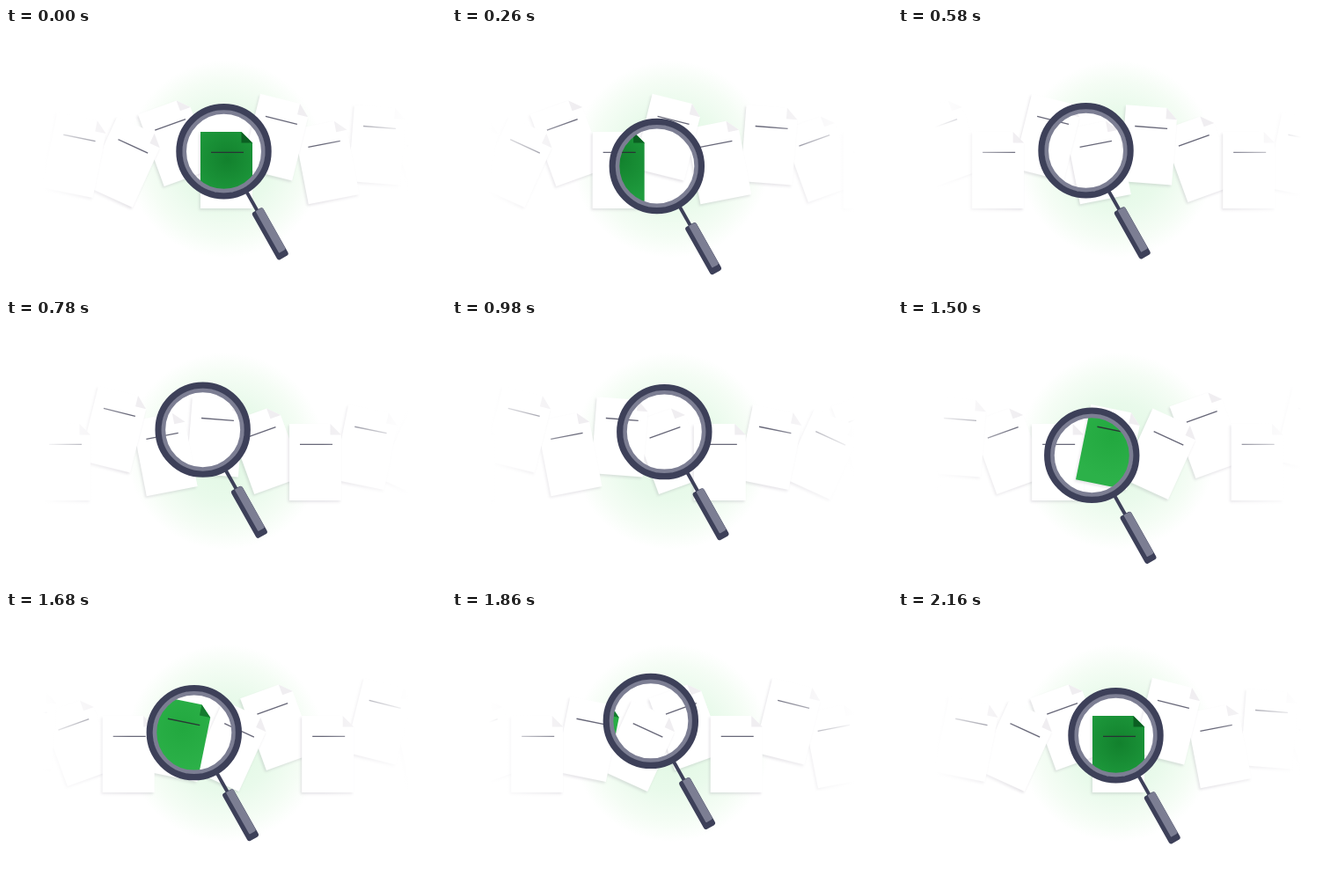
Recreate the animation shown at these times as an HTML page with a canvas. Size 500 by 300 pixels, loop 3580 ms.

```html
<!DOCTYPE html>
<html lang="en">
<head>
<meta charset="utf-8">
<title>Document search</title>
<style>
  html, body { margin: 0; width: 100%; height: 100%; overflow: hidden; background: #fff; }
  canvas { display: block; width: 500px; height: 300px; }
</style>
</head>
<body>
<canvas id="stage" width="500" height="300"></canvas>
<script>
const ctx = document.getElementById('stage').getContext('2d');
const LOOP = 3580, MOVE = 2160, STEP = 20, SPEED = 0.2359;
const TURN = 1140; // end of the first lens turn
const DARK = '#3d4059', LIGHT = '#7c7e93';

// x and y of the title line, tilt in degrees, colours under the lens
const deep = ['#12812d', '#1f9c3e', '#0b5f22'];
const bright = ['#22a83f', '#2cb149', '#147a2e'];
const papers = [
  [83.5, 124.5, 11.5], [144.5, 134, 24.5], [186.5, 109.5, -20], [251.5, 141, 0, deep],
  [313, 104.5, 14], [361.5, 131.5, -11], [424.5, 112.5, 4.5], [473, 127.5, -20],
  [536.5, 141, 0], [598.5, 124.5, 11.5, bright], [661.5, 134, 24.5], [699, 109.5, -20],
  [763, 141, 0, deep], [827, 104.5, 14], [872.5, 131.5, -11], [936, 112.5, 4.5]
].map(([x, y, tilt, green]) => ({ x, y, tilt, green }));

// Later papers lie lower, upright ones lie on top.
const stack = papers.slice().reverse().sort((a, b) => !a.tilt - !b.tilt);
const lensStack = stack.slice().sort((a, b) => !!a.green - !!b.green);

function polygon(points, fill) {
  ctx.beginPath();
  points.forEach(([x, y]) => ctx.lineTo(x, y));
  ctx.closePath();
  ctx.fillStyle = fill;
  ctx.fill();
}

function disc(x, y, r, fill) {
  ctx.beginPath();
  ctx.arc(x, y, r, 0, Math.PI * 2);
  ctx.fillStyle = fill;
  ctx.fill();
}

function box(x, y, w, h, r, fill) {
  ctx.beginPath();
  ctx.roundRect(x, y, w, h, r);
  ctx.fillStyle = fill;
  ctx.fill();
}

function drawPaper(p, shift, inLens) {
  const x = p.x - shift;
  if (x < -60 || x > 560) return;
  const green = inLens && p.green;
  const left = -30.5, right = 28.5, top = -23, bottom = 64, fold = 12.5;
  let fill = '#fff';
  if (green) {
    fill = ctx.createRadialGradient(0, 8, 0, 0, 8, 48);
    fill.addColorStop(0, green[0]);
    fill.addColorStop(1, green[1]);
  }
  ctx.save();
  ctx.translate(x, p.y);
  ctx.rotate(p.tilt * Math.PI / 180);
  ctx.shadowColor = 'rgba(70,55,85,0.13)';
  ctx.shadowBlur = 3;
  ctx.shadowOffsetX = -1.5;
  ctx.shadowOffsetY = 2;
  polygon([[left, top], [right - fold, top], [right, top + fold], [right, bottom], [left, bottom]], fill);
  ctx.shadowColor = 'transparent';
  polygon([[right - fold, top], [right, top + fold], [right - fold, top + fold]], green ? green[2] : '#f0eef1');
  ctx.beginPath();
  ctx.moveTo(-18.5, 0.4);
  ctx.lineTo(18.5, 0.4);
  ctx.lineWidth = 1.4;
  ctx.strokeStyle = green ? 'rgba(42,44,52,0.9)' : '#686879';
  ctx.stroke();
  ctx.restore();
}

function drawGlow() {
  const g = ctx.createRadialGradient(249, 149, 0, 249, 149, 112);
  g.addColorStop(0, '#dff7e2');
  g.addColorStop(0.5, '#e9faeb');
  g.addColorStop(0.8, '#f5fdf5');
  g.addColorStop(1, '#fff');
  disc(249, 149, 112, g);
}

function fadeEdge(from, to) {
  const g = ctx.createLinearGradient(from, 0, to, 0);
  g.addColorStop(0, 'rgba(255,255,255,1)');
  g.addColorStop(1, 'rgba(255,255,255,0)');
  ctx.fillStyle = g;
  ctx.fillRect(from < to ? 0 : to, 0, from < to ? to : 500 - to, 300);
}

function drawLens(x, y, shift) {
  ctx.save();
  ctx.beginPath();
  ctx.arc(x, y, 44, 0, Math.PI * 2);
  ctx.clip();
  ctx.fillStyle = '#fff';
  ctx.fillRect(x - 45, y - 45, 90, 90);
  lensStack.forEach(p => drawPaper(p, shift, true));
  ctx.restore();

  ctx.save();
  ctx.translate(x, y);
  ctx.rotate(60.6 * Math.PI / 180);
  box(51, -2, 28, 4, 0, DARK);
  box(76.5, -7.2, 62, 14.4, 3, DARK);
  box(77, -7, 54.5, 9, [2, 2, 1, 1], LIGHT);
  ctx.restore();

  const ring = (r, width, color) => {
    ctx.beginPath();
    ctx.arc(x, y, r, 0, Math.PI * 2);
    ctx.lineWidth = width;
    ctx.strokeStyle = color;
    ctx.stroke();
  };
  ring(45, 5, LIGHT);
  ring(50.6, 7.2, DARK);
}

function draw(time) {
  const step = Math.floor((time % LOOP) / STEP) * STEP;
  const t = step < MOVE ? step : 0;
  const shift = t * SPEED;
  const turns = t < TURN ? t / TURN : 1 + (t - TURN) / (MOVE - TURN);
  const angle = turns * Math.PI * 2;

  ctx.fillStyle = '#fff';
  ctx.fillRect(0, 0, 500, 300);
  drawGlow();
  stack.forEach(p => drawPaper(p, shift, false));
  fadeEdge(42, 140);
  fadeEdge(458, 360);
  drawLens(230.5 + 17 * Math.cos(angle), 140.2 + 17 * Math.sin(angle), shift);
}

const start = performance.now();
function tick() {
  draw(performance.now() - start);
  requestAnimationFrame(tick);
}
tick();
</script>
</body>
</html>
```
